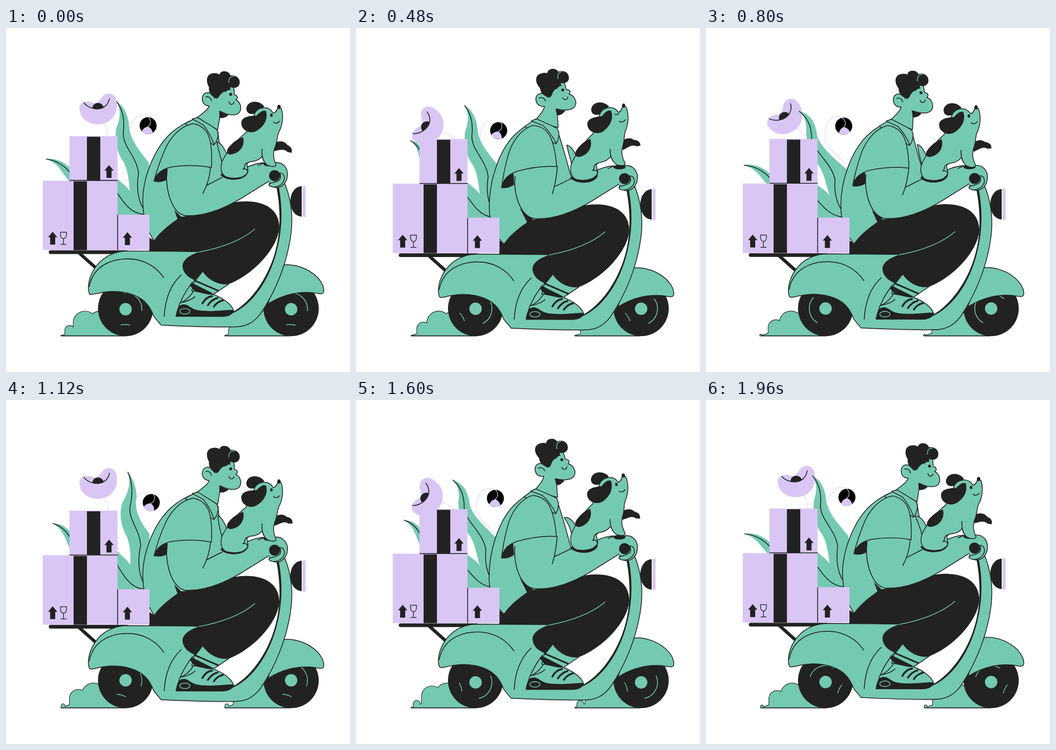
Animation of 748x748 px, one loop 2000 ms. Source, as an HTML page:

```html
<!DOCTYPE html>
<html lang="en">
<head>
<meta charset="utf-8">
<title>Scooter delivery</title>
<style>
  html, body { margin: 0; width: 100%; height: 100%; overflow: hidden; background: #fff; }
  svg { display: block; width: 100vw; height: 100vh; }
  .g { fill: #74c9b1; }
  .k { fill: #222; }
  .v { fill: #d9c6f5; }
  .o { stroke: #222; stroke-width: 1.7; }
  .l { fill: none; stroke: #222; stroke-width: 1.8; }
  .w { fill: none; stroke: #74c9b1; stroke-width: 1.6; }
  .s { fill: none; stroke: #e3d3f4; stroke-width: 1.2; }
  path { stroke-linecap: round; stroke-linejoin: round; }
</style>
</head>
<body>
<svg viewBox="0 0 748 748">
  <defs>
    <path id="arrow" class="k" d="M0-14L10-2H5.5V14H-5.5V-2H-10Z"/>
    <g id="spokes" class="w">
      <path d="M22.5-27.5A35.5 35.5 0 0 1 22.5 27.5"/>
      <path d="M-31.5 17A35.5 35.5 0 0 1-18 31"/>
    </g>
    <g id="dust">
      <path id="puffEdge" class="g" stroke="#222" stroke-width="2.4"/>
      <path id="puffs" class="g"/>
      <path class="l" d="M120 669.3H262"/>
    </g>
  </defs>

  <use href="#dust"/>
  <use href="#dust" x="356"/>
  <g id="wheels"></g>

  <g id="ride">
    <!-- plants -->
    <path id="sideLeaf" class="g"/>
    <path id="sideVein" class="l"/>
    <g id="flower">
      <path class="s" d="M214 206C221 215 223 225 222 244"/>
      <path class="v" d="M162 175C160 160 178 155 190 161C198 165 205 160 212 150C222 138 243 140 244 165C245 195 222 209 203 209C180 209 163 195 162 175Z"/>
      <path class="k" d="M190 173C192 159 212 159 215 173C208 176 198 176 190 173Z"/>
      <path class="l" d="M172 161C185 179 220 184 228 154"/>
    </g>
    <path id="stem" class="s"/>
    <path id="leaf" class="g"/>
    <path id="lowLeaf" class="g"/>
    <path id="vein" class="l"/>
    <path id="lowVein" class="l"/>
    <g id="bud">
      <circle r="18.5"/>
      <path class="v" d="M0 2C-6 4-10 8-12 14A18.5 18.5 0 0 0 12 14C10 8 6 4 0 2Z"/>
      <path class="s" d="M-8-21C4-18 8-6 0 2"/>
    </g>

    <!-- scooter -->
    <path class="g o" d="M605 515C650 512 692 545 691 572C690 580 682 578 677 577C640 570 600 580 570 600L580 560Z"/>
    <path class="l" style="stroke-width:7" d="M160 490L198 524"/>
    <path class="l" style="stroke-width:8" d="M97 487.5H262"/>
    <path id="torso" class="g o"/>
    <path class="g o" d="M181 577C172 550 196 487 262 485L430 486V620H490C532 600 572 545 588 483C598 440 598 390 588 340L606 338C620 372 624 410 620 445C612 510 587 572 553 622C538 641 522 650 495 650C440 651 380 648 337 646C333 640 326 634 321 626C312 602 298 586 270 578C240 569 214 573 190 579C185 580 182 579 181 577Z"/>
    <path class="k" d="M588 344C598 390 598 440 586 484C570 545 530 600 488 620L493 620C538 600 574 545 589 484C602 435 601 385 593 345Z"/>
    <path class="l" d="M181 562C190 515 232 502 265 502C300 502 328 520 343 543M344 627C346 590 358 558 381 537M372 625C375 600 386 578 406 552"/>
    <path class="k" d="M643 344C610 346 610 408 643 410Z"/>
    <rect class="v" x="645" y="343" width="6.5" height="68" rx="2"/>

    <!-- leg and shoe -->
    <path class="g o" d="M410 548L428 528L484 557L450 580L404 572Z"/>
    <path class="k" d="M399 559L404 554L450 577L444 580L410 572Z"/>
    <path class="l" style="stroke-width:3.5" d="M410 549L461 571"/>
    <path class="g o" d="M370 627L378 598C395 592 404 578 408 572C425 574 438 580 450 579C475 588 492 603 495 615C490 625 480 627 470 627Z"/>
    <path class="k" d="M369 627C372 610 375 602 386 601C398 601 402 612 420 614C450 618 478 612 495 613C492 624 480 628 468 628Z"/>
    <ellipse class="w" cx="389" cy="616" rx="11" ry="6"/>
    <path class="l" d="M380 597C392 595 402 592 411 584"/>
    <path class="l" style="stroke-width:4" d="M427 599C432 590 440 584 448 583M439 603C445 594 452 589 460 587M452 606C457 598 464 594 472 592"/>
    <path class="k" d="M311 485V455L322 462C340 437 362 424 378 411C440 405 475 375 525 377C570 378 593 400 594 430C596 470 545 533 484 557C462 560 440 548 428 530L413 549C397 544 386 534 384 520C382 507 395 495 420 487Z"/>
    <path class="w" d="M420 487C470 478 515 460 541 437"/>
    <path id="belt" class="k"/>

    <!-- rider -->
    <g class="lean">
      <path class="g o" d="M390 208L416 195L457 220L462 232L452 255Z"/>
      <g id="head">
        <path class="g o" d="M455 140L497 126L498 146C506 148 506 154 501 157C512 162 515 178 507 186C500 192 485 191 468 182L461 222L415 196C430 185 440 178 443 170C424 169 424 143 438 141C448 140 452 146 455 153Z"/>
        <path class="k" d="M465 180C473 186 480 188 485 190C478 196 471 197 465 196Z"/>
        <path class="k" d="M459 154C450 150 441 142 443 129C435 115 438 100 452 99C458 98 464 100 466 102C468 92 486 92 490 104C503 102 513 112 509 124C505 133 494 132 490 129C488 137 480 137 474 140C465 145 466 152 459 154Z"/>
        <path class="w" d="M486 119C486 109 491 105 498 106"/>
        <path class="l" style="stroke-width:3.5" d="M478 138C481 134 485 133 488 134"/>
        <circle class="k" cx="490" cy="145" r="3.2"/>
        <path class="l" d="M486 161C488 169 495 168 497 162M436 150C442 149 447 152 448 159"/>
      </g>
      <path class="g o" d="M406 198L418 195C432 204 448 213 460 222L462 232C461 243 457 250 453 254C448 238 442 226 430 211Z"/>
    </g>
    <path id="arm" class="g"/>
    <path id="armLine" class="l"/>
    <g class="lean">
      <path class="k" d="M322 333C325 318 335 306 352 306L350 330C340 335 330 336 322 333Z"/>
      <path class="g o" d="M409 208C380 212 356 240 345 267C335 290 328 310 322 333C327 316 340 306 360 302C390 298 420 298 447 304C448 285 449 262 443 240C438 222 425 212 409 208Z"/>
    </g>
    <path id="shirtLine" class="l"/>
    <path class="g o" d="M548 299C565 290 575 294 584 293C602 290 613 305 612 320C611 337 600 347 588 347C577 346 569 341 574 335"/>
    <circle class="k" cx="584" cy="321" r="12"/>
    <path class="g o" d="M572 342C570 336 586 337 594 331C599 326 597 319 595 315C606 315 608 328 602 336C594 346 580 349 572 342Z"/>

    <!-- dog -->
    <path class="k" d="M466 318C474 334 520 335 526 314L500 305Z"/>
    <ellipse class="k" cx="573" cy="296" rx="13" ry="5"/>
    <path id="tail" class="g o"/>
    <g id="dog">
      <path id="paw" class="k" d="M583 250C595 245 606 246 612 255C618 258 624 262 621 272L612 270C605 262 595 266 582 268Z"/>
      <path class="k" d="M562 171C550 155 525 158 523 175C523 190 540 190 552 181Z"/>
      <path class="g o" d="M522 228C505 240 478 272 470 290C464 308 470 324 484 325C505 330 528 322 526 310L524 295L530 291C545 290 553 285 557 279C560 290 565 298 572 300C580 303 588 302 587 297C582 285 580 275 584 262C592 245 588 235 595 224C602 210 604 190 599 175L592 173C589 180 586 186 581 185C572 168 550 172 542 184Z"/>
      <path class="l" d="M557 264C556 275 558 284 561 290M528 292C514 296 522 305 515 307C526 304 530 316 518 321"/>
      <path class="k" d="M566 181C571 200 560 215 545 224C530 232 512 222 512 207C512 195 525 191 545 191C553 182 560 178 566 181Z"/>
      <path class="k" d="M516 238C520 255 510 272 490 275C480 276 478 268 484 260C492 250 505 240 516 238Z"/>
      <ellipse class="k" cx="594" cy="172" rx="3.8" ry="4.6"/>
      <ellipse id="eye" class="k" cx="577.5" cy="190" rx="2.8" ry="3.6"/>
      <path id="lid" class="l" d="M573 189C576 191 579 191 582 188"/>
      <path class="l" d="M582 205C586 209 592 207 595 203"/>
    </g>

    <!-- boxes -->
    <path class="v" d="M138 235H242.5V331H138ZM80 332H242.5V483H80ZM243 406H312V483H243Z"/>
    <path class="k" d="M176 236.5H205V331H176ZM147 333.5H176V483H147Z"/>
    <path class="l" d="M139 331.5H242M242.7 407V482"/>
    <use href="#arrow" x="224" y="312"/>
    <use href="#arrow" x="101.5" y="457"/>
    <use href="#arrow" x="264" y="458"/>
    <path class="l" style="stroke-width:1.5" d="M118.5 444H131.5V449C131.5 461 118.5 461 118.5 449ZM125 458V470M119 470.5H131"/>
  </g>
</svg>
<script>
  const $ = id => document.getElementById(id);
  const put = (id, name, value) => $(id).setAttribute(name, value);
  const turn = (id, deg, x, y) => put(id, 'transform', `rotate(${deg} ${x} ${y})`);
  const wave = x => Math.sin(2 * Math.PI * x);
  const swing = x => (1 - Math.cos(2 * Math.PI * x)) / 2;

  // Each shape blends between two poses; the first entry names its driver.
  const shapes = {
    leaf: ['sway',
      'M200 176C213 186 217 201 216 221C220 250 226 276 243 291C258 311 260 336 268 355L290 400L312 385L308 305C302 296 255 266 240 231C237 201 225 181 200 176Z',
      'M265 151.5C271 173 268 192 254 216C245 236 249 268 262 290C270 308 272 335 270 355L290 400L312 385L312 285C290 258 278 232 284 205C284 190 278 165 265 151.5Z'],
    vein: ['sway',
      'M200 176C222 192 228 214 228 236C235 266 275 290 280 326C278 356 286 380 298 394',
      'M265 151.5C276 176 275 196 271 220C262 252 290 272 293 310C286 340 288 370 298 390'],
    lowLeaf: ['sway',
      'M240 334C252 344 262 348 272 362C285 378 296 380 305 390V410H240Z',
      'M240 321C254 337 264 340 274 360C287 378 296 380 305 390V410H240Z'],
    lowVein: ['sway',
      'M240 367C256 384 270 402 298 405',
      'M240 350C254 374 270 403 298 405'],
    sideLeaf: ['lift',
      'M83 292C102 287 132 298 150 322L150 345C122 332 118 302 83 292Z',
      'M124 231C142 234 152 250 162 288L150 320C138 290 146 252 124 231Z'],
    sideVein: ['lift',
      'M83 292C108 294 130 306 148 330',
      'M124 231C140 242 148 260 152 300'],
    torso: ['back',
      'M326 468C312 450 300 425 298 385C295 330 322 262 360 228C375 215 390 206 408 199L462 226C463 250 467 262 474 282L470 340L380 440Z',
      'M326 468C302 445 291 420 290 390C288 330 310 262 343 228C358 213 370 205 386 197L437 212C448 245 458 280 468 318L470 340L380 440Z'],
    belt: ['back',
      'M366 396L382 412L374 418Z',
      'M357 386L386 407L374 420Z'],
    arm: ['back',
      'M350 305C346 345 358 402 390 408C435 411 485 388 525 362L580 328L566 292C550 293 535 297 522 304L470 323L437 342L447 304Z',
      'M346 312C342 348 354 402 388 408C435 411 485 388 525 362L580 328L566 292C550 293 535 297 522 304L470 323L433 338L438 295Z'],
    armLine: ['back',
      'M350 310C346 345 358 402 390 408C435 411 485 388 525 362L575 331M437 342L470 325M522 304C535 297 545 294 560 293',
      'M346 316C342 348 354 402 388 408C435 411 485 388 525 362L575 331M433 338L470 320M522 304C535 297 545 294 560 293'],
    shirtLine: ['back',
      'M445 304C443 325 436 346 428 360',
      'M438 295C436 318 432 338 427 354'],
    tail: ['wag',
      'M484 285C478 268 466 250 452 254C459 263 465 272 470 294',
      'M484 285C477 263 470 250 463 244C461 256 464 272 470 294']
  };

  const mix = (a, b, k) => {
    const ends = b.match(/-?[\d.]+/g);
    let i = 0;
    return a.replace(/-?[\d.]+/g, n => (+n + (ends[i++] - n) * k).toFixed(2));
  };

  $('wheels').innerHTML = [260, 620].map(x => `<g transform="translate(${x} 610)">
    <circle class="k" r="60"/><g class="hub"><use href="#spokes" class="spin"/>
    <circle class="g" r="13.5"/></g></g>`).join('');

  // Puffs drift left from the wheel and shrink to nothing.
  function dustPath(p) {
    let d = 'M120 669C145 664 160 648 180 640L230 640L262 669Z';
    for (let i = 0; i < 4; i++) {
      const x = 109 + 33 * i + 33 * ((5.9 - 4 * p) % 1);
      const r = Math.min(25, 0.45 * (x - 116));
      if (r < 1) continue;
      const y = Math.max(616, 669 - 0.95 * (x - 116)) + r;
      d += `M${x - r} ${y}a${r} ${r} 0 0 1 ${2 * r} 0V669H${x - r}Z`;
    }
    return d;
  }

  function draw(t) {
    const p = t * 3 % 1;
    const lean = swing(t - 0.06);
    const drive = {
      sway: (wave(t + 0.02) + 0.98) / 1.75,
      lift: (wave(t - 0.12) + 0.9) / 1.9,
      back: lean / 0.93,
      wag: (1 + wave(p + 0.03)) / 2
    };
    for (const [id, [key, a, b]] of Object.entries(shapes)) put(id, 'd', mix(a, b, drive[key]));

    put('ride', 'transform', `translate(0 ${6.8 * swing(p)})`);
    document.querySelectorAll('.lean').forEach(e =>
      e.setAttribute('transform', `rotate(${-8.6 * lean} 377 375)`));
    turn('head', -6 * lean, 445, 210);
    turn('dog', -5 * lean, 470, 315);
    turn('paw', -16 * swing(p), 585, 258);
    turn('flower', -53 * lean, 215, 244);

    const bx = 309 + 10 * wave(t), by = 214 + 7 * wave(t - 0.04);
    put('bud', 'transform', `translate(${bx} ${by}) rotate(${12 + 18 * wave(t - 0.04)})`);
    put('stem', 'd', `M304 300C300 270 ${bx - 42} 265 ${bx - 41} ${by + 17}C${bx - 41} ${by - 8} ${bx - 27} ${by - 24} ${bx - 8} ${by - 21}`);

    const blink = t > 0.41 && t < 0.55;
    put('eye', 'visibility', blink ? 'hidden' : 'visible');
    put('lid', 'visibility', blink ? 'visible' : 'hidden');

    document.querySelectorAll('.hub').forEach(e =>
      e.setAttribute('transform', `translate(0 ${1.5 - 2.6 * wave(p)})`));
    document.querySelectorAll('.spin').forEach(e =>
      e.setAttribute('transform', `rotate(${1620 * t - 45})`));
    const d = dustPath(p);
    put('puffs', 'd', d);
    put('puffEdge', 'd', d);
  }

  const start = performance.now();
  function tick() {
    const ms = (performance.now() - start) % 2000;
    draw(Math.floor(ms / 40) * 0.04);
    requestAnimationFrame(tick);
  }
  tick();
</script>
</body>
</html>
```
